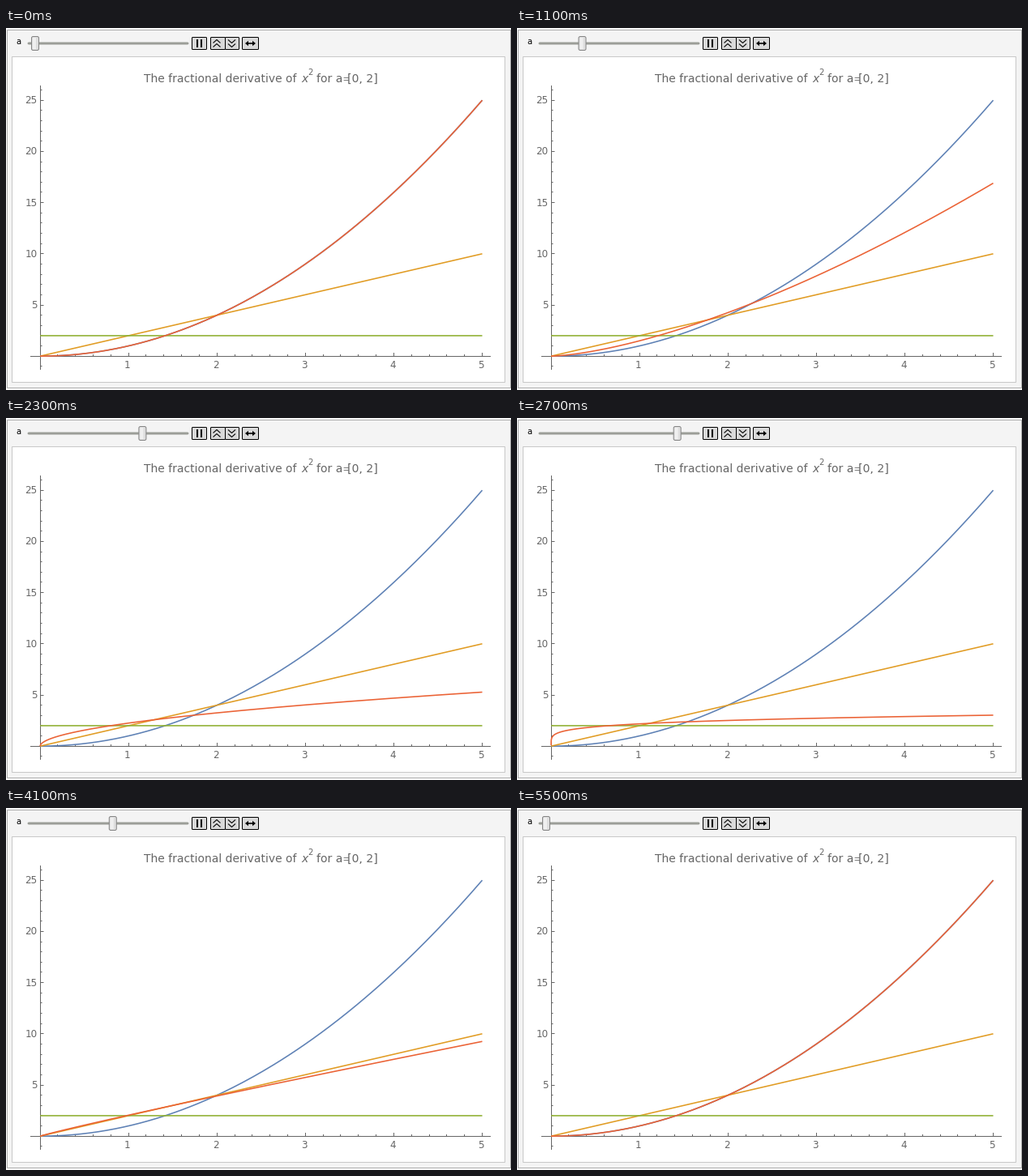
Animation of 623x447 px, one loop 6 s. Source, as a matplotlib script:

```python
import math

import matplotlib.pyplot as plt
import numpy as np
from matplotlib.animation import FuncAnimation
from matplotlib.patches import FancyBboxPatch, Polygon, Rectangle

W, H, DPI = 623, 447, 64
PT = 72 / DPI                      # points per pixel
FRAMES, INTERVAL = 60, 100
X0, Y0, SX, SY = 42.1, 405.2, 109.08, 12.64
GREY = "#666666"
BLUE, ORANGE, GREEN, RED = "#5e81b5", "#e19c24", "#8fb032", "#eb6235"

fig = plt.figure(figsize=(W / DPI, H / DPI), dpi=DPI, facecolor="white")
ax = fig.add_axes([0, 0, 1, 1])
ax.set_xlim(0, W)
ax.set_ylim(H, 0)
ax.axis("off")


def line(xs, ys, color, width=1.0, z=3, **kw):
    kw.setdefault("solid_capstyle", "butt")
    return ax.plot(xs, ys, color=color, lw=width * PT, zorder=z, snap=False, **kw)[0]


def box(x0, y0, x1, y1, face, edge="none", z=1):
    return ax.add_patch(Rectangle((x0, y0), x1 - x0, y1 - y0, facecolor=face,
                                  edgecolor=edge, lw=PT, zorder=z, snap=False))


def round_box(x0, y0, x1, y1, radius, face, edge, z):
    style = f"round,pad=0,rounding_size={radius}"
    return ax.add_patch(FancyBboxPatch((x0, y0), x1 - x0, y1 - y0, boxstyle=style,
                                       facecolor=face, edgecolor=edge, lw=PT,
                                       zorder=z, snap=False))


def label(x, y, text, size, color=GREY, ha="left", **kw):
    kw.setdefault("family", "DejaVu Sans")
    ax.text(x, y, text, fontsize=size * PT, color=color, ha=ha,
            va="baseline", zorder=4, **kw)


def curve(x, y, color, z):
    return line(X0 + SX * x, Y0 - SY * y, color, 1.6, z)


def center(v):
    """Centre of the pixel that holds v."""
    return math.floor(v) + 0.5


def draw_panel():
    box(1.5, 2.5, 622.5, 444.5, "#f4f4f4", "#ababab", 0)
    box(7.5, 35.5, 615.5, 437.5, "white", "#c8c8c8", 1)


def draw_controls():
    label(12, 20, "a", 10, "black")
    line([28, 224], [19, 19], "#9c9e98", 3, solid_capstyle="round")
    for x0, x1 in ((229.5, 247.5), (252.5, 270.5), (270.5, 287.5), (291.5, 311.5)):
        round_box(x0, 11.5, x1, 26.5, 1, "#d9d9d9", "black", 3)
    for x in (235, 240):
        box(x, 14, x + 2, 24, "black", z=4)
    for x, tip, d in ((260, 14.5, 4), (260, 19.5, 4),
                      (278.5, 18.5, -4), (278.5, 23.5, -4)):
        line([x - 4.5, x, x + 4.5], [tip + d, tip, tip + d], "black", 1.1, 4)
    line([297, 306], [19, 19], "black", 1.6, 4)
    for tip, d in ((295, 4), (308, -4)):
        ax.add_patch(Polygon([(tip, 19), (tip + d, 15.8), (tip + d, 22.2)],
                             facecolor="black", lw=0, zorder=4))


def draw_title():
    label(170, 67, "The fractional derivative of", 13.9)
    label(364, 67, "x", 14, style="oblique")
    label(372, 58, "2", 10)
    label(383, 67, "for a", 14)
    label(415, 67, "=", 13, family="Liberation Sans")
    label(421, 67, "[0, 2]", 14)


def draw_axes():
    x_axis, y_axis = center(Y0), center(X0)
    line([30, 598], [x_axis, x_axis], GREY, z=2)
    line([y_axis, y_axis], [71, 422], GREY, z=2)
    for k in range(26):
        x = X0 + SX * k / 5
        major = k % 5 == 0
        line([center(x)] * 2, [x_axis, x_axis - (4.5 if major else 2.5)], GREY, z=2)
        if major and k:
            label(x - 1.3, 420, str(k // 5), 12, ha="center")
    for k in range(-1, 27):
        y = Y0 - SY * k
        major = k % 5 == 0
        line([y_axis, y_axis + (4 if major else 2)], [center(y)] * 2, GREY, z=2)
        if major and k:
            label(38.6, y + 4, str(k), 12, ha="right")


draw_panel()
draw_controls()
draw_title()
draw_axes()

# dense near zero, where the fractional power is steep
xs = 1e-7 + 5 * np.linspace(0, 1, 300) ** 4
curve(xs, xs ** 2, BLUE, 5)
curve(xs, 2 * xs, ORANGE, 6)
curve(xs, np.full_like(xs, 2), GREEN, 7)
moving = curve(xs, xs ** 2, RED, 8)

thumb = round_box(31.5, 10.5, 40.5, 27.5, 2, "#dedede", "#858585", 5)
shine = box(33, 12, 37, 26, "#efefef", z=6)


def order(i):
    """Derivative order: rest, rise from 0 to 2, fall back, rest."""
    u = i / (FRAMES - 1)
    return max(0.0, 4.8 * (min(u, 1 - u) - 1 / 12))


def update(i):
    a = order(i)
    ys = 2 / math.gamma(3 - a) * xs ** (2 - a)
    moving.set_ydata(Y0 - SY * ys)
    thumb.set_x(31.5 + 90 * a)
    shine.set_x(33 + 90 * a)
    return moving, thumb, shine


anim = FuncAnimation(fig, update, frames=FRAMES, interval=INTERVAL,
                     repeat=True, repeat_delay=0, blit=False)
plt.show()
```
